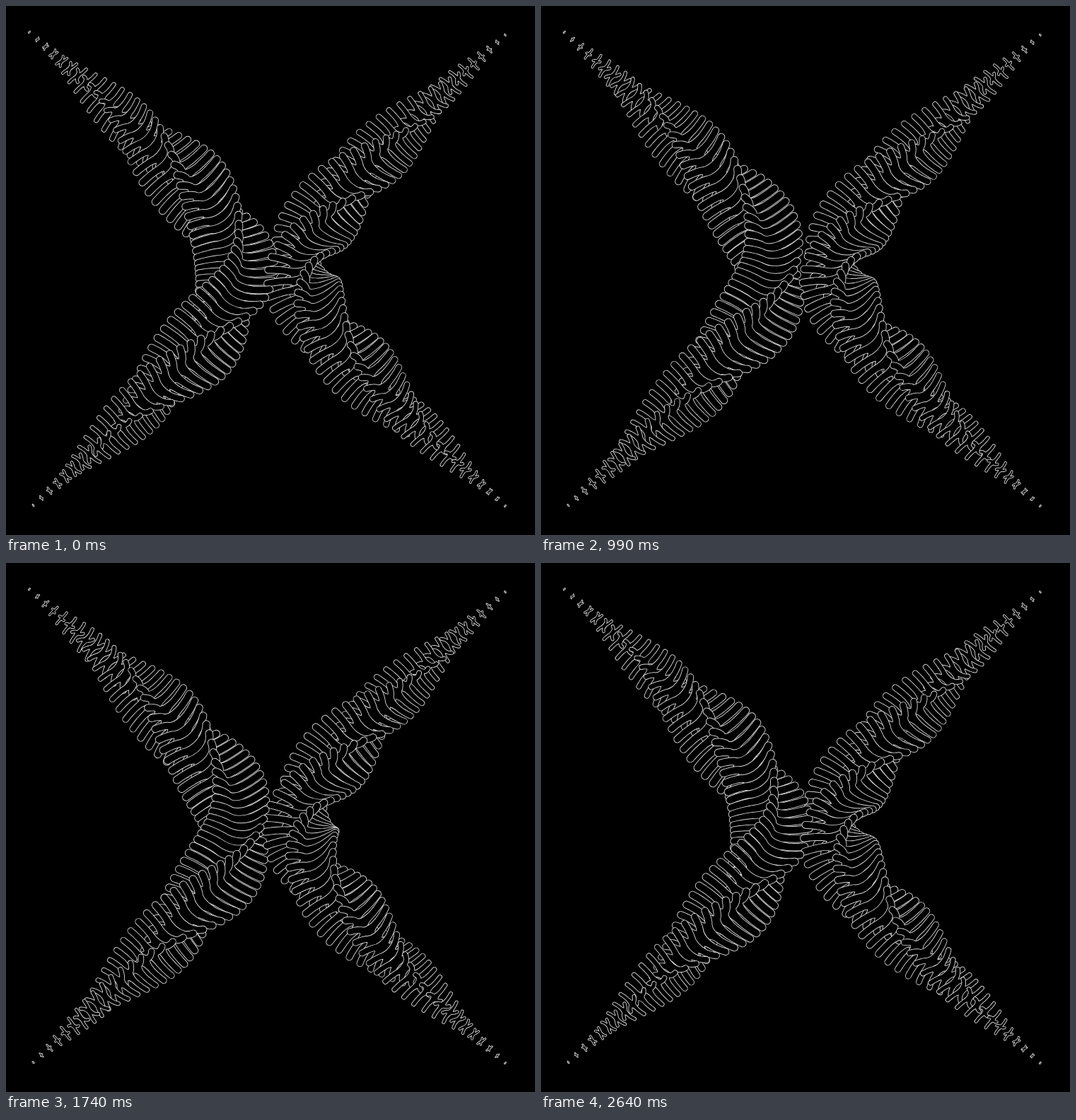
An HTML page with a canvas for the animation above (2670 ms loop, 748 px wide and 748 px high).

```html
<!DOCTYPE html>
<html lang="en">
<head>
<meta charset="utf-8">
<title>Twisting ribs</title>
<style>
html, body { margin: 0; width: 100%; height: 100%; overflow: hidden; background: #000; }
canvas { display: block; width: 748px; height: 748px; }
</style>
</head>
<body>
<canvas id="stage" width="748" height="748"></canvas>
<script>
const ctx = document.getElementById('stage').getContext('2d');
const LOOP = 2670, STEP = 30, RIBS = 66, MID = 374, TAU = Math.PI * 2;

// Each spine is one branch of a hyperbola; ribs sit at equal steps in y.
const spines = [
  { apex: 326, bend: 100, spread: -1.165, top: 37, end: 706, size: 1, seam: 248, pitch: 118, turns: 2, sway: 1 },
  { apex: 416, bend: 90, spread: 1.137, top: 41, end: 707, size: 0.93, seam: 410, pitch: 110, turns: 8, sway: 0 }
];

function halfWidth(p) {
  const x = Math.min(1, (1 - Math.abs(2 * p - 1)) / 0.7);
  return 1.5 + 26 * (Math.sin(x * Math.PI / 2) + x * x * (3 - 2 * x));
}

// A four-armed star seen from the side, its arms slightly swirled and joined by soft curves.
function trace({ x, y, tx, ty, wide, deep, angle }) {
  const point = (arm, r) => {
    const a = angle + arm * Math.PI / 2 + 0.35 * (r - 1);
    const across = wide * r * Math.cos(a), along = -deep * r * Math.sin(a);
    return [x + across * ty + along * tx, y - across * tx + along * ty];
  };
  ctx.beginPath();
  ctx.moveTo(...point(0, 0.5));
  for (let arm = 1; arm <= 4; arm++) {
    ctx.quadraticCurveTo(x, y, ...point(arm, 0.5));
    for (const r of [0.67, 0.84, 1, 0.84, 0.67, 0.5]) ctx.lineTo(...point(arm, r));
  }
  ctx.closePath();
}

function drawRib(s, i, t) {
  const p = i / (RIBS - 1);
  const y = s.top + (s.end - s.top) * p;
  const dy = y - MID, h = Math.hypot(s.bend, dy);
  const x = s.apex + s.spread * (h - s.bend);
  const slope = s.spread * dy / h, len = Math.hypot(1, slope);
  const sway = s.sway * (20 + 20 * p) *
    (Math.sin(TAU * t) + p * 0.5 * (1 - Math.cos(TAU * t)));
  const turn = (y - s.seam - sway) / s.pitch + s.turns * t;
  const wide = halfWidth(p) * s.size;
  trace({
    x, y, tx: slope / len, ty: 1 / len, wide,
    deep: wide * 0.42, angle: Math.PI / 2 * (1 + turn)
  });
  const thick = wide * 0.18;
  ctx.strokeStyle = '#d8d8d8';
  ctx.lineWidth = thick + 1.8;
  ctx.stroke();
  ctx.strokeStyle = '#000';
  ctx.lineWidth = thick;
  ctx.stroke();
  ctx.fill();
}

function draw(ms) {
  const t = Math.floor((ms % LOOP) / STEP) * STEP / LOOP;
  ctx.fillStyle = '#000';
  ctx.fillRect(0, 0, 748, 748);
  ctx.lineCap = ctx.lineJoin = 'round';
  for (let i = 0; i < RIBS; i++) {
    for (const s of spines) drawRib(s, i, t);
  }
}

const start = performance.now();
function tick() {
  draw(performance.now() - start);
  requestAnimationFrame(tick);
}
tick();
</script>
</body>
</html>
```
